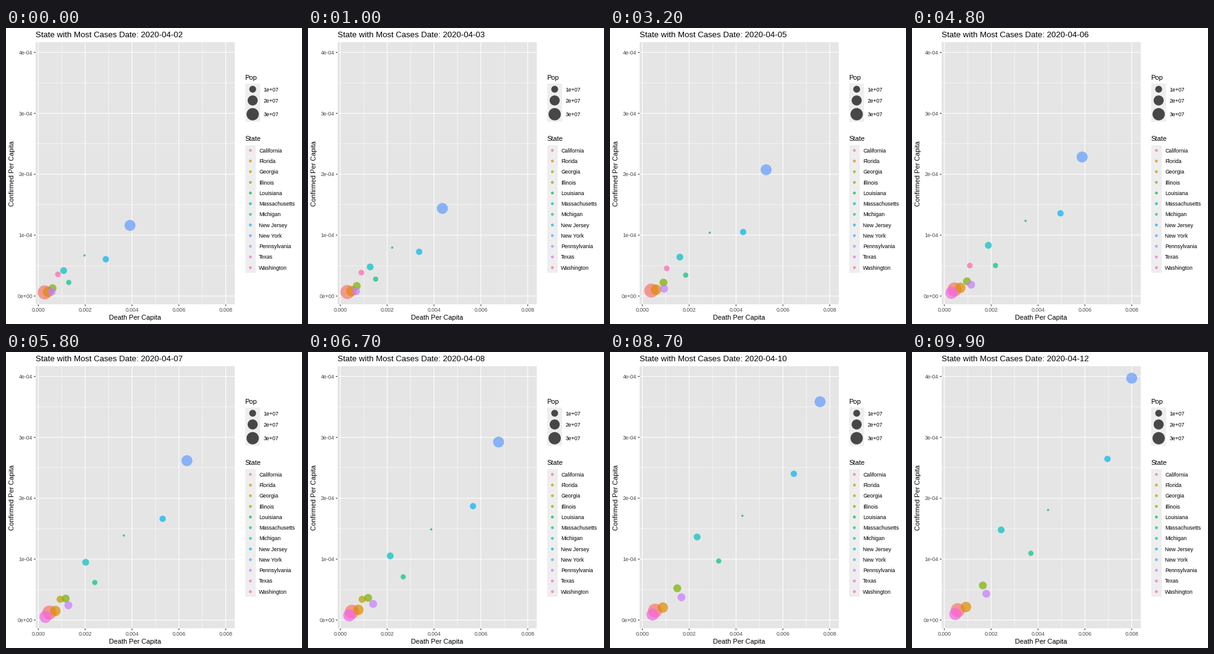
A matplotlib script for the animation above (10 s loop, 480 px wide and 480 px high).

```python
import math

import matplotlib.pyplot as plt
from matplotlib.animation import FuncAnimation
from matplotlib.patches import Circle, Rectangle

FRAMES, INTERVAL = 100, 100
KEYS = [0, 10, 20, 30, 40, 49, 59, 69, 79, 89, 99]
ALPHA = 0.7
INK, GREY = "#000000", "#4D4D4D"

# name: (population in millions, colour)
STATES = {
    "California": (39.512, "#F8766D"),
    "Florida": (21.478, "#DE8C00"),
    "Georgia": (10.617, "#B79F00"),
    "Illinois": (12.672, "#7CAE00"),
    "Louisiana": (4.649, "#00BA38"),
    "Massachusetts": (6.893, "#00C08B"),
    "Michigan": (9.987, "#00BFC4"),
    "New Jersey": (8.882, "#00B4F0"),
    "New York": (23.632, "#619CFF"),
    "Pennsylvania": (12.802, "#C77CFF"),
    "Texas": (28.996, "#F564E3"),
    "Washington": (7.615, "#FF64B0"),
}

# Daily totals; None marks a day outside the top ten.
NA = None
CASES = {
    "California": [10773, 12004, 12837, 15034, 16019, 17351, 18897, 19710, 21081, 21706, 22795],
    "Florida": [9008, 10268, 11545, 12350, 13629, 14747, 15698, 16826, 17968, 18986, 19895],
    "Georgia": [NA] * 6 + [9901] + [NA] * 4,
    "Illinois": [7695, 8904, 10357, 11259, 12262, 12271, 15078, 15078, 17887, 19180, 20852],
    "Louisiana": [9159, 10297, 12496, 13010, 14867, 16284, 17030, 18283, 19253, 20014, 20595],
    "Massachusetts": [8966, 10402, 11736, 12500, 13837, 15202, 16790, 18941, 20974, 22860, 25475],
    "Michigan": [10791, 12744, 14225, 15718, 17221, 18970, 20346, 21504, 22434, 23605, 24244],
    "New Jersey": [25590, 29895, 34124, 37505, 41090, 44416, 47437, 51027, 54588, 58151, 61850],
    "New York": [92506, 102987, 113833, 123160, 131815, 139875, 151061, 161779, 172348, 181026, 189033],
    "Pennsylvania": [7268, 8570, 10444, 11589, 13127, 14853, 16631, 18300, 20051, 21719, 22938],
    "Texas": [NA] * 5 + [8925, NA, 11208, 12105, 13023, 13677],
    "Washington": [6389, 6846, 7247, 7867, 8311] + [NA] * 6,
}
DEATHS = {
    "California": [238, 265, 289, 348, 380, 432, 495, 550, 587, 617, 640],
    "Florida": [144, 170, 195, 221, 254, 296, 323, 371, 419, 446, 461],
    "Georgia": [NA] * 6 + [362] + [NA] * 4,
    "Illinois": [163, 210, 244, 274, 307, 308, 462, 462, 596, 677, 720],
    "Louisiana": [310, 370, 409, 477, 512, 582, 652, 702, 755, 806, 840],
    "Massachusetts": [154, 192, 216, 231, 260, 356, 433, 503, 599, 686, 756],
    "Michigan": [417, 478, 540, 617, 727, 845, 959, 1076, 1276, 1384, 1479],
    "New Jersey": [537, 646, 846, 917, 1003, 1232, 1504, 1700, 1932, 2183, 2350],
    "New York": [2742, 3400, 4308, 4850, 5100, 5433, 6268, 7067, 7844, 8627, 9385],
    "Pennsylvania": [90, 102, 136, 150, 173, 247, 318, 345, 418, 494, 553],
    "Texas": [NA] * 5 + [154, NA, 222, 250, 271, 287],
    "Washington": [271, 293, 314, 338, 381] + [NA] * 6,
}

LEFT, RIGHT, TOP, BOTTOM = 48, 371, 23, 448.3


def px(v):
    return 52.35 + 38000 * v


def py(v):
    return 434.7 - 987800 * v


def radius(pop):
    """Area scale from the smallest to the largest population."""
    return 1.78 + 9.6 * math.sqrt((pop - 4.649) / (39.512 - 4.649))


plt.rcParams["font.family"] = "Liberation Sans"
fig = plt.figure(figsize=(480 / 72, 480 / 72), dpi=72, facecolor="white")
ax = fig.add_axes([0, 0, 1, 1])
ax.set_xlim(0, 480)
ax.set_ylim(480, 0)
ax.axis("off")


def box(x0, y0, x1, y1, color):
    ax.add_patch(Rectangle((x0, y0), x1 - x0, y1 - y0, fc=color, lw=0))


def line(x0, y0, x1, y1, color, width):
    ax.plot([x0, x1], [y0, y1], color=color, lw=width, zorder=1,
            solid_capstyle="butt", snap=False)


def dot(x, y, r, color):
    return ax.add_patch(Circle((x, y), r, fc=color, lw=0, alpha=ALPHA, zorder=2))


def text(x, y, s, size, color=INK, ha="left", rotation=0):
    return ax.text(x, y, s, size=size, color=color, ha=ha, va="baseline",
                   rotation=rotation, rotation_mode="anchor")


def draw_panel():
    box(LEFT, TOP, RIGHT, BOTTOM, "#E5E5E5")
    for i in range(4):
        x = px(0.001 + 0.002 * i)
        y = py(0.5e-4 + 1e-4 * i)
        line(x, TOP, x, BOTTOM, "white", 0.53)
        line(LEFT, y, RIGHT, y, "white", 0.53)
    for i in range(5):
        x, y = px(0.002 * i), py(1e-4 * i)
        line(x, TOP, x, BOTTOM, "white", 1.07)
        line(LEFT, y, RIGHT, y, "white", 1.07)
        line(x, BOTTOM, x, BOTTOM + 2.75, "#333333", 1.07)
        line(LEFT - 2.75, y, LEFT, y, "#333333", 1.07)
        text(x, 460, f"{0.002 * i:.3f}", 8.8, GREY, "center")
        text(43.2, y + 3.2, f"{i}e-04" if i else "0e+00", 8.8, GREY, "right")
    text(209.5, 473, "Death Per Capita", 11, ha="center")
    text(13, 235.7, "Confirmed Per Capita", 11, ha="center", rotation=90)


def draw_legends():
    text(387.5, 84, "Pop", 11)
    box(388, 90.2, 412, 152, "#EEEEEE")
    for n, y in zip((1, 2, 3), (99.3, 117.5, 139.8)):
        dot(400, y, radius(10 * n), "black")
        text(417.5, y + 3.3, f"{n}e+07", 8.8)
    text(387.5, 183, "State", 11)
    box(388, 189.9, 405.2, 397.2, "#EEEEEE")
    for i, (name, (_, color)) in enumerate(STATES.items()):
        y = 198.5 + 17.28 * i
        dot(396.3, y, 2.3, color)
        text(410.2, y + 3.2, name, 8.8)


def blend(a, b, t):
    """Linear move; newcomers show from halfway, leavers stay until the end."""
    if a is None:
        return b if t >= 0.5 else None
    if b is None:
        return a
    return a + (b - a) * t


def at(series, frame):
    if frame in KEYS:
        return series[KEYS.index(frame)]
    i = max(k for k, key in enumerate(KEYS) if key < frame)
    t = (frame - KEYS[i]) / (KEYS[i + 1] - KEYS[i])
    return blend(series[i], series[i + 1], t)


draw_panel()
draw_legends()
title = text(48, 15, "", 13.2)
bubbles = {name: dot(0, 0, radius(pop), color)
           for name, (pop, color) in STATES.items()}


def update(frame):
    day = 2 + 10 * frame // 99
    title.set_text(f"State with Most Cases Date: 2020-04-{day:02d}")
    for name, bubble in bubbles.items():
        cases, deaths = at(CASES[name], frame), at(DEATHS[name], frame)
        bubble.set_visible(cases is not None)
        if cases is not None:
            pop = STATES[name][0] * 1e6
            bubble.center = px(cases / pop), py(deaths / pop)
    return [title, *bubbles.values()]


anim = FuncAnimation(fig, update, frames=FRAMES, interval=INTERVAL,
                     repeat=True, repeat_delay=0, blit=False)
plt.show()
```
